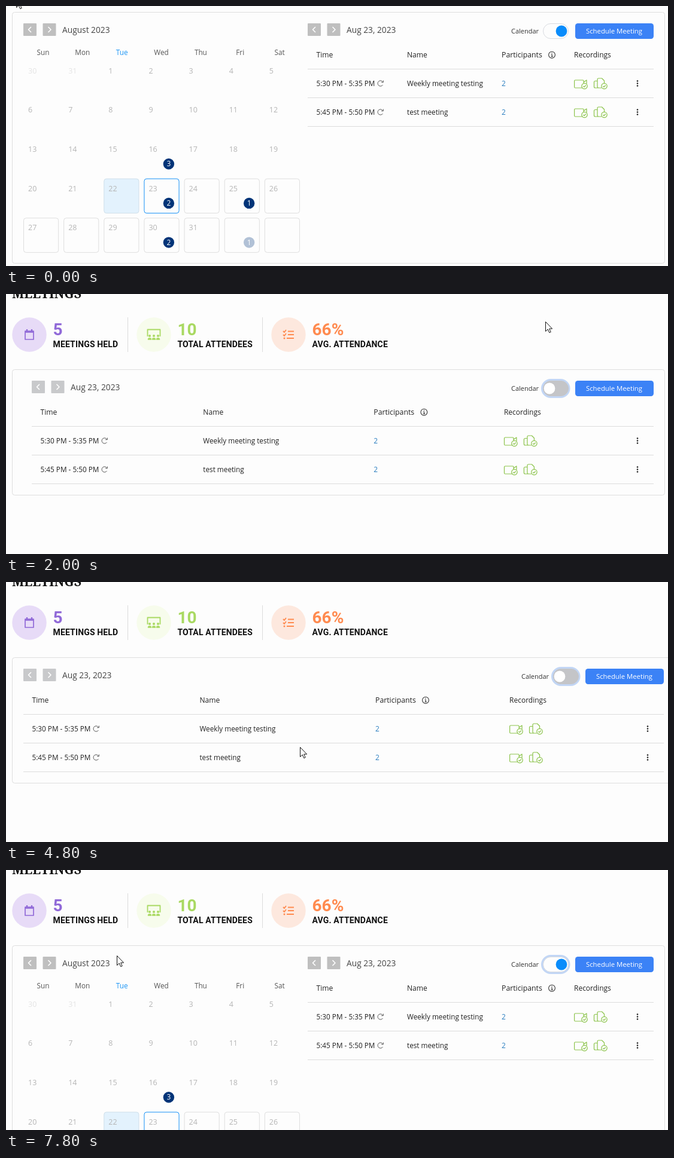
An HTML page that plays this animation: 1106x435 px, repeating every 8 s.

```html
<!DOCTYPE html>
<html lang="en">
<head>
<meta charset="utf-8">
<title>Meetings</title>
<style>
  html, body { margin: 0; width: 100%; height: 100%; overflow: hidden; background: #fdfdfd; }
  svg { display: block; width: 1106px; height: 435px; font-family: "Open Sans", sans-serif; }
  .stat { font-family: Roboto, sans-serif; font-weight: 600; }
</style>
</head>
<body>
<svg id="stage" viewBox="0 0 1106 435"></svg>
<script>
const LOOP = 8000, STEP = 100;
const stage = document.getElementById('stage');
const clamp = v => Math.max(0, Math.min(1, v));
const ease = p => p * p * (3 - 2 * p);

// Pointer glides: first step, last step, where it comes to rest.
const START = [17, -14];
const GLIDES = [
  [2, 4, 814, 166],
  [6, 7, 67, 328], [8, 10, 909, 39],
  [18, 19, 901, 46], [21, 23, 17, 220],
  [25, 28, 110, 265], [30, 30, 90, 276], [31, 34, 594, 287],
  [37, 38, 1062, 250], [39, 41, 145, 288],
  [43, 48, 491, 276], [49, 49, 1062, 250], [50, 51, 624, 209],
  [52, 53, 1031, 81],
  [55, 56, 93, 283], [57, 58, 917, 165],
  [60, 61, 935, 161], [63, 64, 943, 161],
  [76, 78, 185, 143]
];

const text = (x, y, s, size, fill, extra = '') =>
  `<text x="${x}" y="${y}" font-size="${size}" fill="${fill}" ${extra}>${s}</text>`;
const rect = (x, y, w, h, r, fill, stroke = 'none', extra = '') =>
  `<rect x="${x}" y="${y}" width="${w}" height="${h}" rx="${r}" fill="${fill}" stroke="${stroke}" ${extra}/>`;
const circle = (x, y, r, fill, stroke = 'none', extra = '') =>
  `<circle cx="${x}" cy="${y}" r="${r}" fill="${fill}" stroke="${stroke}" ${extra}/>`;
const path = (d, stroke, width = 1, fill = 'none') =>
  `<path d="${d}" fill="${fill}" stroke="${stroke}" stroke-width="${width}" stroke-linejoin="round"/>`;
const group = (x, y, s) => `<g transform="translate(${x} ${y})">${s}</g>`;
const MID = 'text-anchor="middle"';

function navBar(x, label, fill) {
  return rect(x, 29, 22, 21, 1, fill) + rect(x + 32.5, 29, 22, 21, 1, fill) +
    path(`M${x + 13} 35l-4.5 4.5 4.5 4.5M${x + 41.5} 35l4.5 4.5-4.5 4.5`, '#fff', 1.6) +
    text(x + 65, 45, label, 13.75, '#444');
}

function stat(x, value, label, color, tint, icon) {
  return circle(x + 29, 68, 28.7, tint) + group(x + 29, 68, icon) +
    `<g class="stat">${text(x + 68.5, 69, value, 28, color)}` +
    `${text(x + 68.5, 89, label, 14, '#111', 'letter-spacing=".15"')}</g>`;
}

function header() {
  const purple = '#9069d8', green = '#a9d962', orange = '#ff8b50';
  const planner = path('M-7 -6H7V8H-7Z', purple, 1.7) +
    path('M-7 -4.5H7M-4 -9V-6M4 -9V-6', purple, 2.4);
  const people = path('M-10.5 3V-8.5H10.5V3', green, 1.8) +
    [-7, 0, 7].map(x => circle(x, 2, 2, green) +
      path(`M${x - 2.8} 8.5v-1q0-2 2-2h1.6q2 0 2 2v1Z`, green, .6, green)).join('');
  const list = path('M-9 -6l2 2 3-4M-9 0l2 2 3-4M-1 -5.5H9M-1 0H9M-3 6H9', orange, 1.8) +
    circle(-7, 6, 1.5, orange);
  return text(10, 7, 'MEETINGS', 21.3, '#111', 'font-family="Noto Serif, serif" font-weight="700"') +
    stat(10, '5', 'MEETINGS HELD', purple, '#e7dbf7', planner) +
    stat(218, '10', 'TOTAL ATTENDEES', green, '#f7fcec', people) +
    stat(443, '66%', 'AVG. ATTENDANCE', orange, '#fde8de', list) +
    path('M203.5 39V97M428.5 39V97', '#dcdcdc');
}

function calendar(open) {
  const w = 461 * open, col = (w + 9) / 7, cell = Math.max(1, col - 9);
  const badges = { 16: 3, 23: 2, 25: 1, 30: 2, 32: 1 };
  let out = navBar(29, 'August 2023', '#bfbfbf');
  ['Sun', 'Mon', 'Tue', 'Wed', 'Thu', 'Fri', 'Sat'].forEach((name, i) => {
    out += text(29 + (i + .5) * w / 7, 82, name, 11.75, i === 2 ? '#1b95f5' : '#555', MID);
  });
  for (let n = 0; n < 35; n++) {
    const row = Math.floor(n / 7), i = n % 7, day = n - 1;
    // Boxed days crowd towards the left while the grid is narrow.
    const crowd = row === 3 ? 7 * (1 - open) * Math.sin(Math.PI * i / 6) : 0;
    const x = 29 + i * col - crowd, y = 91.5 + row * 65.7;
    if (day > 21) {
      const stroke = day === 23 ? '#1590f6' : day === 22 ? '#cfdfea' : '#dedede';
      out += rect(x + .5, y + .5, cell, 57.5, 4, day === 22 ? '#e3f2fd' : '#fdfdfd', stroke);
    }
    if (day > 0 && day < 32) out += text(x + 8, y + 21, day, 12.5, '#b5b5b5');
    else if (day < 1 && open === 1) out += text(x + 8, y + 21, 31 + day, 12.5, '#e4e4e4');
    if (badges[day]) {
      const bx = x + cell - 16.7;
      out += circle(bx, y + 41.3, 9.2, day > 31 ? '#b1c1d6' : '#003478') +
        text(bx, y + 45.3, badges[day], 12, '#fff', MID);
    }
  }
  return `<g opacity="${clamp(open * 1.2)}">${out}</g>`;
}

const check = (x, y) => circle(x, y, 4.7, '#fdfdfd', '#8bc34a', 'stroke-width="1.2"') +
  path(`M${x - 2.2} ${y}l1.7 1.7 2.8-3.2`, '#8bc34a', 1.2);

function recordings(x, y) {
  const green = '#8bc34a';
  return group(x, y,
    rect(.6, -5.5, 15.5, 13, 1.5, 'none', green, 'stroke-width="1.2"') +
    path('M16 -2l5-3.5V1', green, 1.2) + check(17.5, 4.5) +
    path('M39 -4h-3.5q-2 0-2 2V5.5q0 2 2 2H45M39 5V-6.5q0-2 2-2h5.5l4 4V1M39 5q0 2.5 2 2.5h5', green, 1.2) +
    check(50.5, 4.5));
}

function table(left, right, nav) {
  const grow = right - left - 578;
  const time = left + 14.5, name = left + 166 + .261 * grow;
  const people = left + 324 + .5366 * grow, rec = left + 445 + .746 * grow;
  const ink = '#222', info = people + 84;
  let out = navBar(left, 'Aug 23, 2023', nav) +
    text(time, 86, 'Time', 12.1, ink) + text(name, 86, 'Name', 12.1, ink) +
    text(people, 86, 'Participants', 12.3, ink) + text(rec, 86, 'Recordings', 12, ink) +
    circle(info, 81.7, 5.4, 'none', '#333', 'stroke-width="1.1"') +
    path(`M${info - 1.2} 81h1.4v3.5m-1.6 0h3.2M${info - .5} 78.6h1.2`, '#333', 1.1) +
    path(`M${left} 105.5H${right}M${left} 153.5H${right}M${left} 201.5H${right}`, '#dcdcdc');
  [['5:30 PM - 5:35 PM', 'Weekly meeting testing'], ['5:45 PM - 5:50 PM', 'test meeting']]
    .forEach(([slot, title], i) => {
      const y = 129.5 + 48 * i, rx = left + 121.5;
      out += text(time, y + 4.3, slot, 11.75, ink) + text(name, y + 4.3, title, 11.75, ink) +
        text(people, y + 4.3, 2, 12, '#2c7fc0') +
        path(`M${rx + 4} ${y - 2.5}A4.6 4.6 0 1 0 ${rx + 4} ${y + 2.5}M${rx + 4.8} ${y - 5}v3.2h-3.2`, '#555') +
        recordings(rec, y) +
        [-4, 0, 4].map(d => circle(right - 27, y + d, 1.3, '#222')).join('');
    });
  return out;
}

function controls(right, on, focus) {
  const x = right - 185, lit = on > .4;
  return text(right - 238, 46, 'Calendar', 11, '#333') +
    (focus ? rect(x - 1, 28, 44.5, 28, 14, 'none', '#c2d6f5', 'stroke-width="4"') : '') +
    rect(x + .5, 29.5, 42, 25, 12.5, lit ? '#fdfdfd' : '#c4c5c8', lit ? '#d9dbe0' : '#c4c5c8') +
    circle(x + 11 + 20 * on, 42, 9.4, on > .95 ? '#0a8cfb' : lit ? '#2a9ffb' : '#fff') +
    rect(right - 131, 29, 131, 26, 4.5, '#3b82f6') +
    text(right - 66, 46, 'Schedule Meeting', 11.35, '#fff', MID);
}

function pointer(step) {
  let [x, y] = START;
  for (const [from, to, tx, ty] of GLIDES) {
    const p = ease(clamp((step - from + 1) / (to - from + 1)));
    x += (tx - x) * p;
    y += (ty - y) * p;
  }
  const hand = (step >= 10 && step < 16) || (step >= 58 && step < 64);
  const shape = hand
    ? path('M-1.5 14V2Q-1.5 .5 .3 .5T2 2V7.5Q5 6.5 5 9Q7.5 8 7.7 10.2Q9.5 9.8 9.5 12V16Q9.5 19 7.5 20.5V23.5H-2V21' +
        'Q-4 18-6.4 14.5Q-7 12.5-5 12Q-3.5 12-1.5 14ZM2 7.5V12M5 9V12.5M7.7 10.2V13', '#111', 1.1, '#fff')
    : path('M.5 .5V16.5L4.2 13 6.8 18.7 9.2 17.6 6.7 12.1H11.6Z', '#111', 1, '#fff');
  return group(x, y, shape);
}

const knob = step => step < 16 ? 1 - .58 * clamp(step - 14) : 1 - .4 ** Math.max(0, step - 67);

function draw(step) {
  const open = step < 16 ? 1 - .5 * clamp(step - 14) : clamp((step * STEP - 6822) / 300);
  const wide = step >= 21 && step < 69;
  const list = step >= 16 && step < 69;
  const shift = step < 16 ? 0 : 116;
  const right = wide ? 1099 : 1082;
  const left = wide ? 29 : 43 + 461 * open;
  stage.innerHTML = rect(0, 0, 1106, 435, 0, '#fdfdfd') +
    group(0, shift - 116, header()) +
    group(0, shift,
      rect(10.5, 10.5, right + 8, list ? 210 : 420, 4, '#fdfdfd', '#dedede') +
      (open > 0 ? calendar(open) : '') +
      table(left, right, open < 1 ? '#c8c9cb' : '#bfbfbf') +
      controls(right, knob(step), step >= 15)) +
    pointer(step);
}

let shown = -1;
function tick(now) {
  const step = Math.floor((now % LOOP) / STEP);
  if (step !== shown) draw(shown = step);
  requestAnimationFrame(tick);
}
tick(performance.now());
</script>
</body>
</html>
```
